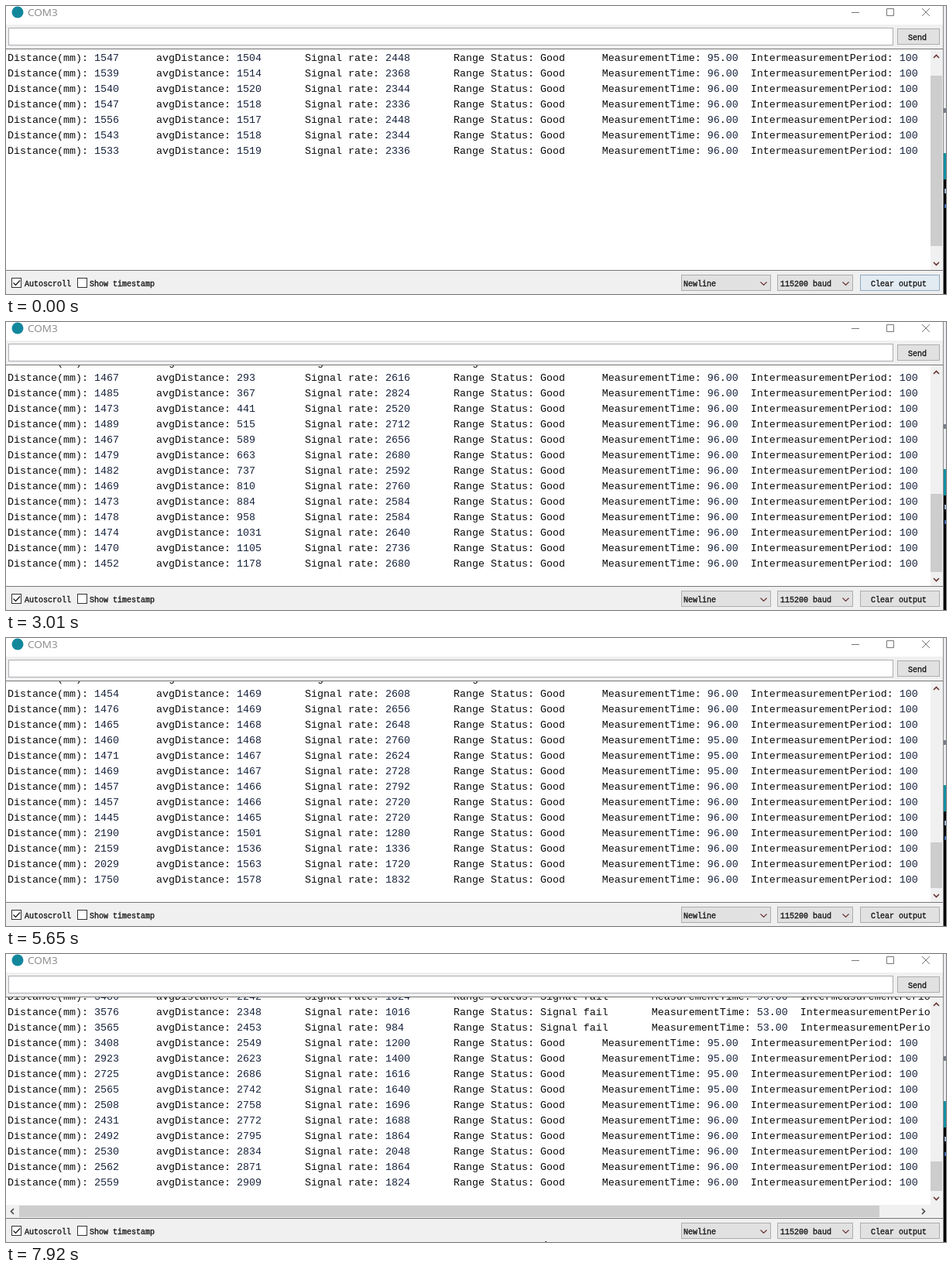
Recreate the animation shown at these times as an HTML page. Size 1214 px wide and 372 px high, loop 8000 ms.

```html
<!DOCTYPE html>
<html lang="en">
<head>
<meta charset="utf-8">
<title>Serial monitor</title>
<style>
  html, body { margin: 0; width: 100%; height: 100%; overflow: hidden; background: #fff; }
  svg { display: block; width: 1214px; height: 372px; }
  .log { font: 13.33px "Liberation Mono", monospace; fill: #0a0a0a; white-space: pre; }
  .log tspan { fill: #17233c; }
  .ui { font: 10px "Liberation Mono", monospace; fill: #111; stroke: #111; stroke-width: .3; }
  .title { font: 13.5px "Open Sans", sans-serif; fill: #8a8a8a; }
  .line { fill: none; stroke: #777; }
  .arrow { fill: none; stroke: #6a3434; stroke-width: 1.6; }
  .dark { stroke: #444; }
  .box { fill: #e1e1e1; stroke: #adadad; }
  .check { fill: #fff; stroke: #333; }
  .bar { fill: #f0f0f0; }
  .thumb { fill: #cdcdcd; }
</style>
</head>
<body>
<svg viewBox="0 0 1214 372" xmlns="http://www.w3.org/2000/svg">
  <defs>
    <clipPath id="view"><rect id="viewBox" x="0" y="56" width="1194" height="285"/></clipPath>
  </defs>
  <rect width="1214" height="372" fill="#fff"/>

  <circle cx="15" cy="8" r="7.5" fill="#12879c"/>
  <text class="title" x="28" y="13">COM3</text>
  <path class="line" d="M1092 8.5h10M1137.5 3.5h9v9h-9zM1183 3l10 10M1193 3l-10 10"/>

  <rect class="bar" y="24" width="1210" height="31"/>
  <rect x="3.5" y="28.5" width="1142" height="22" fill="#fff" stroke="#abadb3"/>
  <rect class="box" x="1151.5" y="29.5" width="54" height="20"/>
  <text class="ui" x="1165" y="44">Send</text>
  <path class="line" d="M0 55.5h1210"/>

  <g id="log" clip-path="url(#view)"></g>

  <rect class="bar" x="1194" y="56" width="16" height="285"/>
  <rect id="thumb" class="thumb" x="1194" width="15"/>
  <path class="arrow" d="M1198 67l3.5-3.5 3.5 3.5"/>
  <path id="down" class="arrow" d="M1198 0l3.5 3.5 3.5-3.5"/>
  <g id="wide">
    <rect class="bar" y="324" width="1210" height="17"/>
    <rect class="thumb" x="17" y="325" width="1111" height="15"/>
    <path class="arrow dark" d="M10 329l-3.5 3.5 3.5 3.5M1183 329l3.5 3.5-3.5 3.5"/>
  </g>

  <rect class="bar" y="341" width="1210" height="31"/>
  <path class="line" d="M0 341.5h1210"/>
  <rect class="check" x="7.5" y="351.5" width="12" height="12"/>
  <path d="M9.5 357.5l3 3 5.5-6" fill="none" stroke="#222" stroke-width="1.4"/>
  <text class="ui" x="24" y="362">Autoscroll</text>
  <rect class="check" x="92.5" y="351.5" width="12" height="12"/>
  <text class="ui" x="108" y="362">Show timestamp</text>
  <rect class="box" x="872.5" y="347.5" width="115" height="20"/>
  <text class="ui" x="875" y="362">Newline</text>
  <rect class="box" x="996.5" y="347.5" width="97" height="20"/>
  <text class="ui" x="1000" y="362">115200 baud</text>
  <path class="arrow" style="stroke-width:1.2" d="M974.5 356.5l4 4 4-4M1080.5 356.5l4 4 4-4"/>
  <rect id="clear" class="box" x="1103.5" y="347.5" width="102" height="20"/>
  <text class="ui" x="1117" y="362">Clear output</text>

  <path d="M1210.5 0v372" stroke="#8c8c8c"/>
  <rect x="1211" width="3" height="190" fill="#e9ebee"/>
  <rect x="1211" y="132" width="3" height="6" fill="#777d88"/>
  <rect x="1211" y="190" width="3" height="34" fill="#1190a2"/>
  <rect x="1211" y="224" width="3" height="148" fill="#000"/>
  <rect x="1212" y="236" width="2" height="6" fill="#9fb6d6"/>
  <rect x="1212" y="256" width="2" height="5" fill="#3f6fae"/>

  <path id="mouse" d="M0 0v16.5l3.8-3.6 2.7 6.2 2.6-1.1-2.7-6h5.2z" fill="#fff" stroke="#000"/>
</svg>
<script>
const LOOP = 8000, ROW = 20, WINDOW = 20, TRACK_TOP = 74;
const $ = id => document.getElementById(id);

// distance/average/signal[/time]
const before = `1547/1504/2448/95 1539/1514/2368 1540/1520/2344 1547/1518/2336
  1556/1517/2448 1543/1518/2344 1533/1519/2336 1538/1527/2400 1545/1533/2424
  1529/1537/2376 1521/1540/2440 1513/1540/2424/95 1510/1539/2472/95
  1508/1536/2568/95 1500/1535/2440`;

// distance/signal[/time], F marks a failed reading
const after = `1433/2776/61 1505/2496 1465/2736 1467/2616 1485/2824 1473/2520
  1489/2712 1467/2656 1479/2680 1482/2592 1469/2760 1473/2584 1478/2584
  1474/2640 1470/2736 1452/2680 1470/2600 1462/2656/95 1480/2712/95
  1466/2592/95 1464/2680/95 1456/2656 1475/2848 1470/2728 1465/2656 1474/2664
  1477/2680 1454/2608 1476/2656 1465/2648 1460/2760/95 1471/2624/95
  1469/2728/95 1457/2792 1457/2720 1445/2720 2190/1280 2159/1336 2029/1720
  1750/1832 1816/1680 1800/1696 1945/1472/95 2575/1320/95 3170/1128/95
  3322/1128/95 3269/1152 3294/1160 3286/1152 3486/1024/96F 3576/1016/53F
  3565/984/53F 3408/1200/95 2923/1400/95 2725/1616/95 2565/1640/95 2508/1696
  2431/1688 2492/1864 2530/2048 2562/1864 2559/1824`;

const parse = text => text.trim().split(/\s+/).map(item => item.split("/"));

// Tab stops every 8 columns
const tabbed = parts => parts.reduce((line, part) =>
  line + " ".repeat(8 - line.length % 8) + part);

const reading = (dist, avg, signal, time = "96") => tabbed([
  "Distance(mm): " + dist,
  "avgDistance: " + avg,
  "Signal rate: " + signal,
  "Range Status: " + (time.endsWith("F") ? "Signal fail" : "Good"),
  "MeasurementTime: " + parseInt(time) + ".00",
  "IntermeasurementPeriod: 100"
]);

const history = [];
function averaged([dist, signal, time]) {
  history.push(+dist);
  const sum = history.slice(-WINDOW).reduce((a, b) => a + b, 0);
  return reading(dist, Math.floor(sum / WINDOW), signal, time);
}

const lines = [
  ...parse(before).map(item => reading(...item)),
  "VL53L1X Qwiic Test", "Sensor online!", "2",
  ...parse(after).map(averaged)
];
const firstWide = lines.findIndex(line => line.includes("fail"));

// [line, arrival ms]; lines between two anchors arrive evenly
const anchors = [[6, 0], [7, 70], [8, 120], [9, 280], [14, 680], [15, 1230],
  [17, 1310], [18, 1390], [23, 1860], [24, 2000], [25, 2090], [26, 2250],
  [28, 2400], [29, 2540], [30, 2620], [31, 2780], [32, 2870], [33, 3010],
  [43, 4090], [53, 5130], [54, 5290], [55, 5350], [56, 5510], [57, 5650],
  [60, 5890], [61, 6050], [62, 6130], [63, 6290], [64, 6370], [65, 6520],
  [70, 6980], [79, 7920]];

function arrival(i) {
  const k = anchors.findIndex(a => a[0] >= i);
  if (k < 1) return 0;
  const [i0, t0] = anchors[k - 1], [i1, t1] = anchors[k];
  return t0 + (t1 - t0) * (i - i0) / (i1 - i0);
}
const times = lines.map((_, i) => arrival(i));

const markup = line => line.replace(/ /g, "\u00a0").replace(/\d+/g, "<tspan>$&</tspan>");

let shown = -1;
function drawLog(count) {
  if (count === shown) return;
  shown = count;
  const wide = count > firstWide;
  const view = wide ? 268 : 285, track = wide ? 233 : 250;
  const height = (count + 1) * ROW;
  const scroll = Math.max(0, height - view);

  let html = "";
  for (let i = Math.max(0, Math.floor(scroll / ROW) - 1); i < count; i++)
    html += `<text class="log" x="2" y="${71 + i * ROW - scroll}">${markup(lines[i])}</text>`;
  $("log").innerHTML = html;
  $("viewBox").setAttribute("height", view);

  // Until the log overflows, the thumb rests where it was
  const top = scroll ? Math.round(TRACK_TOP + track * scroll / height) : 90;
  const bottom = scroll ? TRACK_TOP + track - 1 : 310;
  $("thumb").setAttribute("y", top);
  $("thumb").setAttribute("height", bottom - top);
  $("down").setAttribute("transform", `translate(0 ${wide ? 314 : 331})`);
  $("wide").style.display = wide ? "" : "none";
}

function drawMouse(t) {
  let x = 697, y = 380;
  if (t >= 1700 && t < 2000) {
    const p = t < 1860 ? (t - 1700) / 160 : t < 1940 ? 1 : (2000 - t) / 60;
    x = 697 - 31 * p;
    y = 372 - 110.5 * p;
  } else if (t >= 6900) y = 371;
  $("mouse").setAttribute("transform", `translate(${x} ${y})`);
}

function draw(t) {
  drawLog(times.filter(at => at <= t + 1).length);
  drawMouse(t);
  const hover = t < 70;
  $("clear").style.fill = hover ? "#e3ebf2" : "";
  $("clear").style.stroke = hover ? "#8fa9bd" : "";
}

const start = performance.now();
function tick() {
  draw((performance.now() - start) % LOOP);
  requestAnimationFrame(tick);
}
tick();
</script>
</body>
</html>
```
